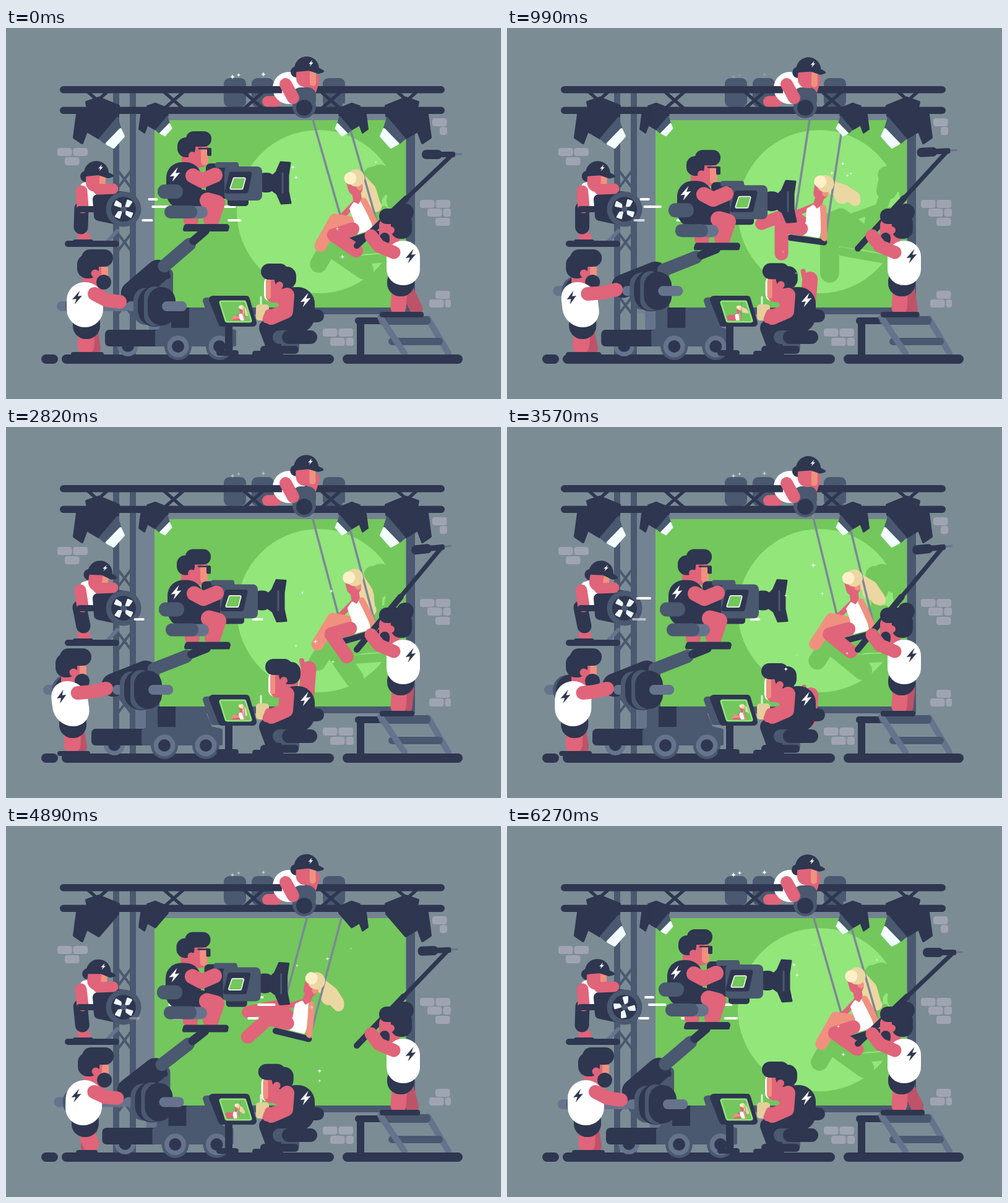
Recreate the animation shown at these times as an HTML page with a canvas. Size 800 by 600 pixels, loop 6300 ms.

```html
<!DOCTYPE html>
<html>
<head>
<meta charset="utf-8">
<style>
html, body { margin: 0; height: 100%; overflow: hidden; background: #7b8c95; }
canvas { display: block; }
</style>
</head>
<body>
<canvas id="stage" width="800" height="600"></canvas>
<script>
const c = document.getElementById('stage').getContext('2d');
const LOOP = 6300, RAD = Math.PI / 180, TAU = Math.PI * 2;
const WALL = '#7b8c95', NAVY = '#2e3650', MID = '#4a5870', SLATE = '#66738d', ROPE = '#7d8798',
  SKIN = '#e0647a', DARK_SKIN = '#bd5369', LIT = '#f0917f', WHITE = '#fff',
  GREEN = '#73c75c', GLOW = '#92e67a', HAIR = '#ebd7a2', BRICK = '#a0a4b2';

// Drawing helpers
function rect(col, x, y, x2, y2, r = 0) {
  c.fillStyle = col;
  c.beginPath();
  c.roundRect(x, y, x2 - x, y2 - y, r);
  c.fill();
}
function disc(col, x, y, r) {
  c.fillStyle = col;
  c.beginPath();
  c.arc(x, y, r, 0, TAU);
  c.fill();
}
function dome(col, x, y, r) {
  c.fillStyle = col;
  c.beginPath();
  c.arc(x, y, r, Math.PI, 0);
  c.fill();
}
function trace(p) {
  c.beginPath();
  for (let i = 0; i < p.length; i += 2) c.lineTo(p[i], p[i + 1]);
}
function line(col, w, ...p) {
  c.strokeStyle = col;
  c.lineWidth = w;
  c.lineCap = c.lineJoin = 'round';
  trace(p);
  c.stroke();
}
function poly(col, w, ...p) {
  c.fillStyle = c.strokeStyle = col;
  c.lineWidth = w;
  c.lineJoin = 'round';
  trace(p);
  c.closePath();
  c.fill();
  c.stroke();
}
function at(x, y, draw, rot = 0, sx = 1, sy = sx) {
  c.save();
  c.translate(x, y);
  c.rotate(rot * RAD);
  c.scale(sx, sy);
  draw();
  c.restore();
}
function bolt(col, x, y, s = 1) {
  at(x, y, () => poly(col, .3, 4, -11, -8, 3, -1, 2, -4, 11, 8, -3, 1, -2), 0, s);
}
function star(x, y, s, a) {
  c.globalAlpha = a;
  c.fillStyle = '#f0fff0';
  c.beginPath();
  c.moveTo(x, y - s);
  for (const [dx, dy] of [[1, 0], [0, 1], [-1, 0], [0, -1]])
    c.quadraticCurveTo(x, y, x + dx * s, y + dy * s);
  c.fill();
  disc('#f0fff0', x, y, s * .32);
  c.globalAlpha = 1;
}

// Timing helpers
const clamp = v => Math.max(0, Math.min(1, v));
const smooth = p => p * p * (3 - 2 * p);
const cubic = p => p < .5 ? 4 * p ** 3 : 1 - 4 * (1 - p) ** 3;
const ramp = (t, a, b) => smooth(clamp((t - a) / (b - a)));
const pulse = (t, a, b, d, e) => ramp(t, a, b) - ramp(t, d, e);
const rand = n => { const v = Math.sin(n * 127.1 + 31.7) * 43758.5453; return v - Math.floor(v); };

function poseAt(t) {
  const u = t / LOOP * 2 % 1;
  const wave = shift => Math.cos((u - shift) * TAU);
  return {
    t,
    dolly: -22 * pulse(t, 450, 1800, 3900, 5300),
    drop: pulse(t, 100, 1050, 3750, 5250),
    light: 1 - pulse(t, 3900, 4150, 5350, 5700),
    swing: 16 - 31 * cubic(1 - Math.abs(2 * u - 1)),
    kick: 5 + 53 * wave(.05),
    hairX: 40 + 12 * wave(.3),
    hairY: 40 - 13 * wave(.3),
    bob: 1.4 * wave(.25)
  };
}

function brickRow(x, end, y) {
  for (; x < end; x += 25.5) rect(BRICK, x, y, Math.min(x + 23.5, end), y + 13, 4);
}
function bricks() {
  brickRow(83, 133, 194);
  brickRow(95, 119, 209);
  brickRow(689, 713, 146);
  brickRow(701, 713, 160);
  brickRow(669, 719, 278);
  brickRow(681, 719, 292);
  brickRow(694, 719, 307);
  brickRow(694, 719, 425);
  brickRow(684, 719, 439);
  brickRow(512, 562, 486);
  brickRow(524, 562, 501);
}

function girl(p, angle, tint) {
  const f = col => tint || col;
  const shin = (x, y, len, deg) => {
    const d = (deg - angle) * RAD;
    return [x, y, x + len * Math.sin(d), y + len * Math.cos(d)];
  };
  const s = Math.sin(angle * RAD), k = Math.cos(angle * RAD);
  const tx = 10 + p.hairX * k - p.hairY * s, ty = 121 + p.hairY * k + p.hairX * s;
  const hair = f(HAIR);
  line(hair, 22, 18, 123, (18 + tx) / 2 + 4, (123 + ty) / 2 - 3, tx - 3, ty - 4);
  disc(hair, (18 + tx) / 2 + 2, (123 + ty) / 2 + 4, 13);
  disc(hair, tx, ty, 9);
  line(f(SKIN), 9, 2, 158, -25, 174);
  line(f(p.swing > 5 ? LIT : SKIN), 20, -4, 192, ...shin(-37, 176, 48, -55 + 1.6 * p.swing));
  line(f(NAVY), 10, -29, 215, 26, 214);
  line(f(SKIN), 14, 9, 136, 6, 160);
  poly(f(WHITE), 6, -7, 166, 0, 160, 6, 166, 13, 160, 16, 177, 15, 205, -15, 205, -5, 187);
  line(f(SKIN), 22, -14, 198, ...shin(-46, 199, 44, p.kick));
  if (!tint) line(ROPE, 3.5, 27, 0, 27, 211);
  line(f(LIT), 10, 16, 159, 20, 178, 25, 207);
  rect(f(SKIN), -3, 115, 20, 146, 9);
  rect(f(LIT), 11, 127, 21, 141, 5);
  disc(hair, 14, 120, 14);
  disc(f('#fff0c8'), 5, 118, 10);
}

function backdrop(p) {
  for (const x of [173, 200]) rect(MID, x, 104, x + 10, 530);
  for (let y = 232; y < 500; y += 102) {
    line(MID, 4, 182, y, 201, y + 25);
    line(MID, 4, 201, y, 182, y + 25);
  }
  rect('#738392', 210, 139, 647, 462);
  rect(MID, 647, 139, 661, 462);
  rect(MID, 228, 452, 661, 463);
  rect(GREEN, 240, 149, 646, 452);
  c.save();
  c.beginPath();
  c.rect(240, 149, 406, 303);
  c.clip();
  c.globalAlpha = p.light;
  disc(GLOW, 505, 297, 132);
  c.globalAlpha = 1;
  // The cast shadow is larger and drifts against the swing
  const tilt = p.swing * .6 - 6;
  at(616 - 2.6 * p.swing, 74, () => girl(p, tilt, GREEN), -tilt, 1.4);
  c.restore();
  for (const x of [352, 397, 512]) rect(MID, x, 81, x + 36, 128, 9);
}

function swing(p) {
  at(519, 131, () => {
    line(ROPE, 3.5, -27, 0, -27, 211);
    girl(p, p.swing);
  }, -p.swing);
}

function lamp(x, y, s, side, light) {
  at(x, y, () => {
    poly(NAVY, 4, -18, -30, 2, -37, 34, -24, 33, -8, 2, 28, -15, 18, -12, -4);
    poly(NAVY, 4, -28, -20, -10, -4, -25, 36, -38, 27, -33, -10);
    c.globalAlpha = light;
    poly(MID, 2, 3, 29, 32, -5, 37, 11, 11, 36);
    poly('#f1fdff', 4, 15, 37, 37, 14, 42, 25, 26, 43);
    c.globalAlpha = 1;
  }, 0, s * side, s);
}

function truss(p) {
  for (const x of [148, 271, 400, 525, 648]) {
    line(NAVY, 5, x - 15, 104, x + 15, 130);
    line(NAVY, 5, x + 15, 104, x - 15, 130);
  }
  rect(NAVY, 87, 94, 709, 105.5, 6);
  rect(NAVY, 87, 127.5, 709, 139, 6);
  lamp(148, 150, 1, 1, p.light);
  lamp(240, 146, .65, 1, p.light);
  lamp(560, 146, .65, -1, p.light);
  lamp(648, 150, 1, -1, p.light);
}

function cap(x, y, tilt) {
  at(x, y, () => {
    disc(NAVY, -16, 5, 9);
    rect(SKIN, -16, -6, 16, 30, 15);
    rect(LIT, 6, 2, 16, 28, 5);
    dome(NAVY, 1, 0, 20);
    poly(NAVY, 4, -18, -1, 12, -4, 27, 4, 20, 6, 5, 1, -16, 3);
    bolt(WHITE, 8, -9, .45);
  }, tilt);
}

function topMan(p) {
  rect(SKIN, 414, 110, 445, 128, 9);
  disc(WHITE, 457, 97, 26);
  rect(NAVY, 414, 94, 446, 105.5);
  rect(NAVY, 414, 127.5, 520, 139);
  line(SKIN, 16, 499, 83, 494, 100);
  rect(MID, 463, 96, 501, 130, 13);
  disc(MID, 482, 127, 19);
  disc(NAVY, 482, 129, 13);
  line(SKIN, 20, 452, 91, 464, 113);
  cap(485 + p.bob, 66 + p.bob, p.bob);
}

function fanMan(p) {
  const lean = pulse(p.t, 700, 1900, 4400, 5500);
  line(SLATE, 6, 180, 328, 160, 349);
  rect(NAVY, 95, 344, 183, 354, 5);
  line(SKIN, 14, 122, 336, 130, 338);
  line(NAVY, 23, 122 - 3 * lean, 292, 121 + 4 * lean, 322);
  rect(NAVY, 108, 342, 141, 349, 4);
  poly(WHITE, 14, 127, 257, 146, 252, 152, 270, 133, 286);
  poly(NAVY, 16, 148, 277, 186, 272, 188, 312, 150, 304);
  cap(145 + 6 * lean, 235 + lean, 8 * lean);
  line(SKIN, 17, 149, 261, 173, 260);
  line(SKIN, 19, 122 - 2 * lean, 264, 124, 290);
  rect(NAVY, 114, 288, 145, 298, 5);
  disc(MID, 190, 293, 28.5);
  disc(NAVY, 190, 293, 20);
  at(190, 293, () => {
    for (let i = 0; i < 4; i++) {
      c.rotate(TAU / 4);
      poly('#eef8fb', 3, 6, 0, 15, -4, 17, 2, 9, 3);
    }
    disc(MID, 0, 0, 5);
  }, 40 + p.t / LOOP * 360 * 19);
}

function wind(p) {
  [277, 289, 311].forEach((y, row) => {
    for (let i = 0; i < 3; i++) {
      const n = row * 3 + i, run = (p.t / LOOP * 6 + rand(n)) * 260 % 260;
      c.globalAlpha = Math.min(1, run / 12, (260 - run) / 35);
      line(WHITE, 4, 198 + run, y, 207 + run + 12 * rand(n + 50), y);
    }
  });
  c.globalAlpha = 1;
}

function dolly(p) {
  const weightY = 450 - 25 * p.drop;
  const tipX = 322 + 24 * p.drop, tipY = 328 + 30 * p.drop;
  const along = q => [237 + (tipX - 237) * q, 401 + (tipY - 401) * q];
  at(p.dolly, 0, () => {
    rect(SLATE, 82, weightY - 8, 200, weightY + 8, 8);
    disc(MID, 120, weightY, 24);
    disc(NAVY, 126, weightY, 25);
    rect(MID, 247, 390, 270, 492, 7);
    rect(SLATE, 231, 420, 248, 492);
    disc(NAVY, 261, 401, 5);
    line(NAVY, 38, ...along(-.38), ...along(.1));
    line(MID, 21, ...along(.22), ...along(.7));
    line(NAVY, 14, ...along(.78), ...along(1));
    disc(SLATE, 197, 514, 17);
    disc(NAVY, 197, 514, 10);
    rect(NAVY, 160, 488, 252, 515, 7);
    rect(NAVY, 267, 452, 302, 490);
    poly(MID, 4, 298, 454, 340, 454, 353, 486, 370, 490, 370, 513, 243, 513, 243, 491, 250, 487, 298, 487);
    for (const x of [278, 345]) {
      disc(MID, x, 515, 22);
      disc(SLATE, x, 515, 17.5);
      disc(NAVY, x, 515, 10);
    }
    rect(SLATE, 194, weightY - 8, 292, weightY + 8, 8);
    rect(MID, 206, weightY - 30, 246, weightY + 30, 20);
    rect(NAVY, 213, weightY - 33, 267, weightY + 33, 27);
    rect(MID, 223, weightY - 32, 257, weightY + 32, 18);
    rect(NAVY, 229, weightY - 31, 274, weightY + 31, 23);
    rect(SLATE, 252, weightY - 8, 292, weightY + 8, 8);
  });
}

function pusher(p) {
  const push = pulse(p.t, 3300, 4200, 4300, 5350);
  const lean = 8 * push - 13 * pulse(p.t, 0, 1200, 2900, 3700);
  const body = p.dolly + 6 * push;
  const step = 11 * Math.sin(p.dolly / 22 * Math.PI * 3);
  at(body, 0, () => {
    line(DARK_SKIN, 20, 139, 492, 143 + step, 518);
    line(SKIN, 27, 130, 490, 129 - step, 514);
    rect(NAVY, 105 - step, 524, 140 - step, 532, 4);
    rect(NAVY, 130 + step, 524, 158 + step, 532, 4);
    rect(NAVY, 108, 455, 152, 503, 21);
    at(lean, 0, () => {
      rect(SKIN, 124, 382, 164, 426, 14);
      rect(LIT, 154, 386, 165, 404, 3);
      disc(NAVY, 158, 411, 12);
      rect(NAVY, 115, 366, 150, 405, 16);
      rect(NAVY, 122, 358, 173, 386, 14);
      disc(SKIN, 144, 397, 6.5);
    });
    c.save();
    c.transform(1, 0, -lean / 100, 1, lean * 4.6, 0);
    rect(WHITE, 98, 411, 157, 484, 29);
    bolt(NAVY, 115, 436, .95);
    c.restore();
  });
  line(SKIN, 22, 143 + body + lean * .4, 430, 162 + body, 440 - 12 * p.drop, 184 + p.dolly, 443 - 20 * p.drop);
}

function camera() {
  rect(NAVY, 405, 234, 436, 266, 14);
  rect(MID, 430, 235, 448, 266, 6);
  poly(NAVY, 3, 431, 239, 437, 233, 444, 217, 459, 218, 456, 238, 456, 264, 460, 283, 445, 284, 438, 268, 431, 263);
  line(MID, 3, 447, 235, 447, 266);
  rect(NAVY, 323, 219, 377, 276, 7);
  rect(MID, 338, 217, 376, 226, 4);
  rect(NAVY, 358, 270, 392, 288, 5);
  rect(MID, 353, 224, 414, 279, 8);
  poly(NAVY, 7, 357, 264, 364, 236, 394, 236, 388, 264);
  const screen = [364, 259, 369, 244, 385, 244, 381, 259];
  poly(WHITE, 5, ...screen);
  poly(GREEN, 2, ...screen);
}

function operator(p) {
  at(p.dolly + 24 * p.drop, 30.5 * p.drop, () => {
    line(SKIN, 24, 296, 286, 299, 311);
    at(-3 * p.drop, 0, () => {
      rect(SKIN, 284, 198, 314, 230, 10);
      rect(SKIN, 299, 185, 327, 225, 11);
      rect(LIT, 315, 192, 327, 222, 6);
      rect(NAVY, 277, 177, 306, 209, 14);
      rect(NAVY, 291, 167, 332, 192, 12);
      disc(SKIN, 301, 206, 6);
      line(NAVY, 2.5, 312, 195, 330, 195);
      rect(NAVY, 325, 194, 332, 207, 2);
    });
    at(-9 * p.drop, 0, camera);
    rect(NAVY, 259, 217, 316, 292, 25);
    rect(NAVY, 275, 261, 330, 294, 14);
    line(SKIN, 26, 326, 279, 341, 283, 332, 310);
    line(SKIN, 24, 302, 239, 317, 247, 338, 238);
    bolt(WHITE, 273, 237);
    rect(MID, 245, 253, 286, 276, 11);
    rect(SLATE, 280, 288, 326, 308, 10);
    rect(MID, 256, 287, 309, 308, 10);
    rect(NAVY, 287, 317, 318, 328, 5);
    rect(NAVY, 311, 317, 361, 327, 5);
    rect(NAVY, 286, 322, 360, 329, 3);
  });
}

function boomMan(p) {
  const move = pulse(p.t, 150, 1700, 4200, 5400);
  const ex = 720 - 17 * move, ey = 206 - 10 * move;
  const bx = 567, by = 352 + 8 * move;
  line(NAVY, 7, bx, by, ex, ey);
  line(NAVY, 10, bx, by, bx + (ex - bx) * .52, by + (ey - by) * .52);
  at(ex, ey - 1, () => {
    line(SLATE, 3, 0, -1, 16, -1);
    rect(NAVY, -48, -8, -15, 7, 7);
    rect(NAVY, -20, -5, 6, 4, 3);
  }, -6 * move);

  line(DARK_SKIN, 21, 649, 425, 663 - 17 * move, 454);
  rect(NAVY, 640 - 8 * move, 459, 675 - 15 * move, 468, 4);
  line(SKIN, 25, 636, 423, 634, 452);
  rect(NAVY, 604, 459, 646, 468, 4);
  rect(NAVY, 616, 389, 660, 434, 21);
  rect(SKIN, 603, 307, 637, 350, 12);
  rect(NAVY, 604, 331, 620, 351, 8);
  rect(NAVY, 603, 292, 648, 317, 12);
  rect(NAVY, 622, 300, 656, 341, 15);
  disc(NAVY, 645, 298, 14);
  disc(SKIN, 622, 327, 6);
  rect(WHITE, 615, 344, 669, 416, 26);
  line(SKIN, 21, 627, 363, 603, 353, 590, 336);
  bolt(NAVY, 654, 369);
}

function monitor(p) {
  rect(NAVY, 354, 470, 366, 528);
  rect(NAVY, 340, 521, 376, 530, 5);
  poly(MID, 10, 323, 441, 338, 440, 354, 477, 335, 477);
  poly(NAVY, 12, 334, 439, 388, 439, 399, 477, 349, 477);
  const screen = [348, 444, 385, 444, 394, 473, 357, 473];
  poly(GLOW, 7, ...screen);
  poly(GREEN, 2, ...screen);
  c.save();
  trace(screen);
  c.clip();
  const tilt = p.swing * .4;
  at(374, 421, () => girl(p, tilt), -tilt, .26);
  c.restore();
}

function director(p) {
  const nod = 7 * pulse(p.t, 600, 2500, 2900, 3600) - 5 * pulse(p.t, 3300, 4200, 4500, 6200);
  const raise = pulse(p.t, 350, 1400, 2900, 3700);
  if (raise) at(-2 * raise, 46 * (1 - raise), () => {
    line(SKIN, 25, 488, 430, 491, 391);
    line(SKIN, 8, 483, 392, 480, 378);
  });
  rect(MID, 444, 505, 474, 524, 8);
  rect(NAVY, 411, 514, 473, 527, 6);
  rect(NAVY, 398, 522, 448, 531, 5);
  line(NAVY, 26, 455, 485, 422, 485, 432, 512);
  at(nod, -.85 * nod, () => {
    rect(SKIN, 434, 405, 465, 447, 10);
    rect(WHITE, 417, 402, 440, 442, 10);
    rect(SKIN, 420, 400, 450, 444, 12);
    rect(LIT, 420, 405, 428, 438, 5);
    rect(NAVY, 434, 386, 469, 422, 15);
    rect(NAVY, 412, 381, 456, 407, 13);
    disc(SKIN, 442, 416, 6);
  });
  rect(NAVY, 441, 419, 499, 493, 27);
  bolt(WHITE, 484, 440);
  rect(NAVY, 470, 455, 514, 476, 11);
  line(SKIN, 24, 454, 432, 452, 458, 429, 468);
  line('#e4f0da', 3, 412, 435, 412, 452);
  rect('#e4cf9b', 404, 447, 425, 473, 5);
  line(SKIN, 13, 425, 461, 421, 471);
  rect(MID, 431, 489, 475, 511, 11);
  rect(NAVY, 446, 489, 503, 511, 11);
}

function ground() {
  line(SLATE, 10, 682, 470, 715, 526);
  rect(NAVY, 564, 468, 612, 479, 5);
  rect(NAVY, 567, 473, 579, 532);
  rect(MID, 602, 466, 686, 480, 6);
  rect(MID, 618, 501, 706, 513, 6);
  line(SLATE, 10, 605, 468, 644, 526);
  for (const [a, b] of [[57, 84], [90, 530], [544, 738]]) rect(NAVY, a, 528, b, 543, 7.5);
}

function sparkles(t) {
  const top = .55 + .45 * Math.cos(t / LOOP * 3 * TAU);
  star(366, 79, 5, top);
  star(376, 76, 4, top);
  star(416, 75, 5, top);
  for (let i = 0; i < 42; i++) {
    const age = (t / LOOP + i / 42) % 1 * 7;
    if (age < 1)
      star(440 + 160 * rand(i), 170 + 240 * rand(i + 99) + 18 * age, 3 + 2 * rand(i + 7), Math.sin(age * Math.PI));
  }
}

function frame() {
  const p = poseAt(performance.now() % LOOP);
  rect(WALL, 0, 0, 800, 600);
  bricks();
  backdrop(p);
  swing(p);
  truss(p);
  topMan(p);
  ground();
  boomMan(p);
  fanMan(p);
  wind(p);
  dolly(p);
  pusher(p);
  operator(p);
  monitor(p);
  director(p);
  sparkles(p.t);
  requestAnimationFrame(frame);
}
frame();
</script>
</body>
</html>
```
